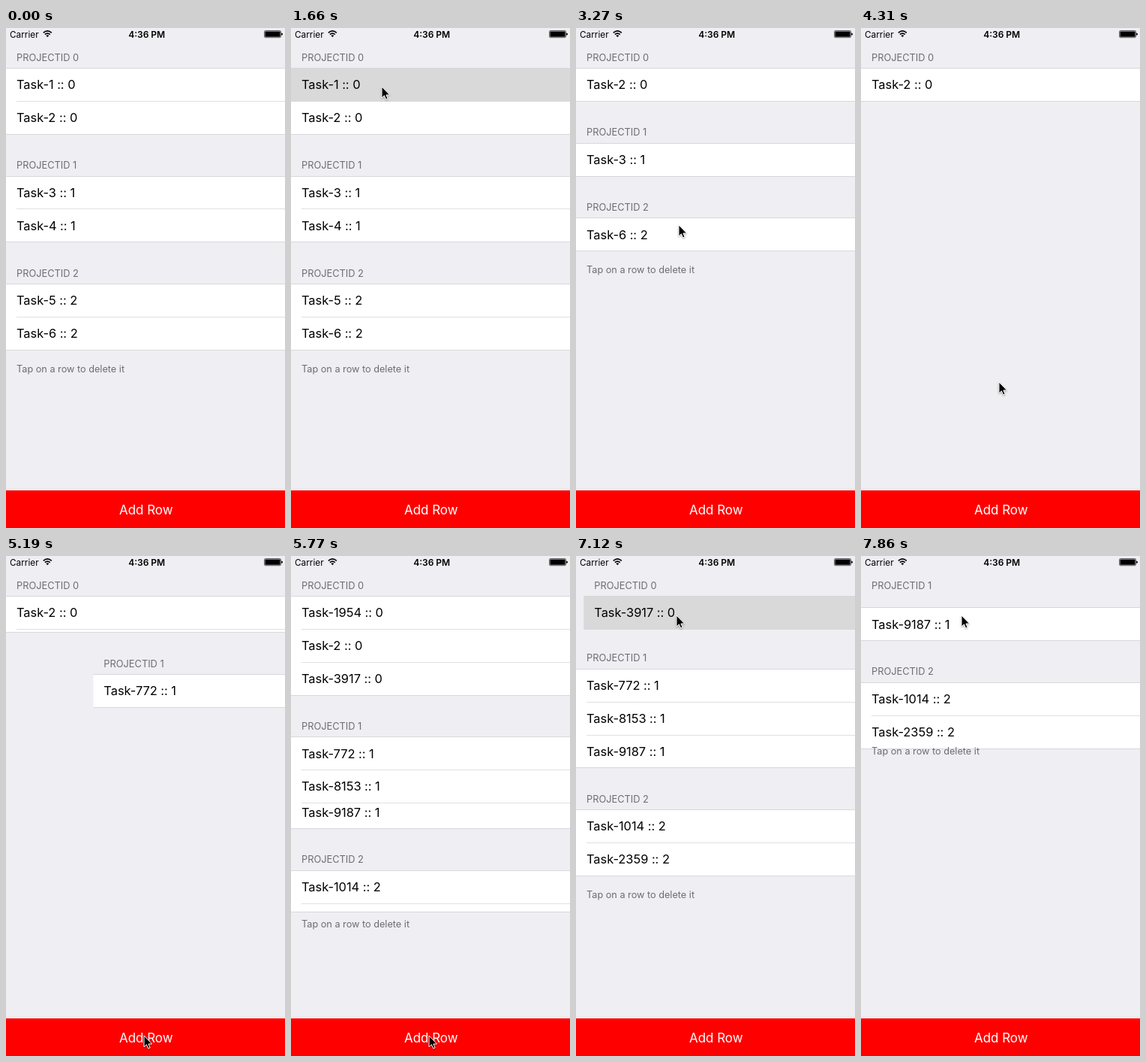
An HTML page for the animation above (8 s loop, 372 by 665 pixels).

```html
<!DOCTYPE html>
<html lang="en">
<head>
<meta charset="utf-8">
<title>Task list</title>
<style>
  html, body { margin: 0; width: 100%; height: 100%; overflow: hidden; background: #eeeef3; }
  svg { display: block; width: 372px; height: 665px; font-family: Inter, Roboto, "Liberation Sans", sans-serif; }
  .task { font-size: 16.4px; letter-spacing: -.02px; }
  .head { font-size: 12.8px; fill: #6d6d72; }
  .foot { font-size: 12.7px; fill: #6d6d72; }
</style>
</head>
<body>
<svg viewBox="0 0 372 665">
  <rect width="372" height="665" fill="#eeeef3"/>
  <g id="list"></g>
  <text x="5" y="12.6" font-size="11.8">Carrier</text>
  <g fill="none" stroke="#000" stroke-width="1.7">
    <path d="M49.8 6.3Q55.3 1.3 60.8 6.3M51.9 8.6Q55.3 5.5 58.7 8.6"/>
    <path d="M53.4 10.1Q55.3 8.4 57.2 10.1L55.3 12.2Z" fill="#000" stroke="none"/>
  </g>
  <text x="187.7" y="12.6" font-size="12" font-weight="600" text-anchor="middle">4:36 PM</text>
  <rect x="344.5" y="3.5" width="22" height="9.2" rx="1.6" fill="none" stroke="#000" stroke-width=".6"/>
  <rect x="345.4" y="4.4" width="20.2" height="7.4" rx=".6"/>
  <path d="M367.2 6.6Q369 6.8 369 8.2T367.2 9.8Z"/>
  <rect y="615" width="372" height="50" fill="#f00"/>
  <text x="186.8" y="646.5" font-size="16.9" fill="#fff" text-anchor="middle">Add Row</text>
  <g id="cursor" style="filter:drop-shadow(0 1px 1px rgba(0,0,0,.35))">
    <path d="M0 0V15L3.4 11.8L5.7 17L8.1 16L5.9 11H10.6Z" stroke="#fff" stroke-width="1"/>
  </g>
</svg>
<script>
const LOOP = 8000, WIDTH = 372, TOP = 53.6, ROW = 43.85, GAP = 55.75;
const MOVE = 280, PRESS = 100, NEVER = 1e9;

const row = (name, born = -NEVER, gone = NEVER) => ({ name, born, gone });
const section = (id, born, gone, ...rows) => ({ id, born, gone, rows });

const sections = [
  section(0, -NEVER, 7095,
    row(1, -NEVER, 1755), row(1954, 5440, 6400), row(2, -NEVER, 6700), row(3917, 5130)),
  section(1, -NEVER, 3880, row(3), row(4, -NEVER, 2200)),
  section(1, 5010, NEVER, row(772, -NEVER, 7400), row(8153, 5240, 7691), row(9187, 5574)),
  section(2, -NEVER, 3600, row(5, -NEVER, 2900), row(6)),
  section(2, 5340, NEVER, row(1014), row(2359, 5676)),
];

// time, x, y
const cursorPath = [
  [740, 83, 78], [1180, 121, 78], [1810, 121, 78], [2100, 130, 212], [2250, 130, 212],
  [2540, 137, 262], [3650, 137, 262], [3857, 150, 175], [3950, 150, 175], [4303, 184, 471],
  [4451, 184, 545], [4600, 183, 605], [4750, 184, 638], [5780, 184, 638], [6060, 150, 330],
  [6240, 134, 79], [LOOP, 134, 79],
];

// The screen refreshes in bursts: first time, last time, refresh count
const bursts = [
  [740, 1180, 4], [1660, 2680, 8], [2830, 3270, 4], [3560, 4600, 8],
  [4750, 4750, 1], [5040, 6060, 8], [6240, 7270, 8], [7410, 7860, 4],
];
const ticks = [0];
for (const [from, to, n] of bursts)
  for (let i = 0; i < n; i++) ticks.push(from + (n > 1 ? (to - from) * i / (n - 1) : 0));

const progress = (t, start) => {
  const u = Math.min(1, Math.max(0, (t - start) / MOVE));
  return u * u * (3 - 2 * u);
};
const presence = (item, t) => progress(t, item.born) * (1 - progress(t, item.gone));

const text = (cls, y, content) => `<text class="${cls}" x="14" y="${y.toFixed(2)}">${content}</text>`;
const line = (x, y, color) => `<rect x="${x}" y="${y}" width="${WIDTH - x}" height="1" fill="${color}"/>`;

function drawRow(r, id, y, pressed, first, last, opacity) {
  const top = Math.floor(y), bottom = Math.floor(y + ROW);
  return `<g opacity="${opacity}">
    <rect y="${top + 1}" width="${WIDTH}" height="${bottom - top}" fill="${pressed ? '#d9d9d9' : '#fff'}"/>
    ${first ? line(0, top, '#d8d7dc') : ''}
    ${line(last || pressed ? 0 : 14, bottom, last || pressed ? '#d8d7dc' : '#e0dfe3')}
    ${text('task', y + 27.7, `Task-${r.name} :: ${id}`)}</g>`;
}

function footerShift(t) {
  let shift = 0;
  for (const s of sections) for (const r of s.rows) {
    shift += 24 * Math.sin(Math.PI * progress(t, r.gone));
    if (s.id === 2) shift += 13 * Math.sin(Math.PI * progress(t, r.born));
  }
  return shift;
}

function drawSection(s, y, t) {
  const rows = s.rows.map(r => ({ r, p: presence(r, t) })).filter(o => o.p > 0);
  const fullBefore = i => rows.slice(0, i).some(o => o.p === 1);
  const moving = [], settled = [];
  let top = y;
  rows.forEach(({ r, p }, i) => {
    const hidden = p < 1 && fullBefore(i) ? ROW * (1 - p) : 0;
    const leaving = p < 1 && !hidden && t > r.gone;
    const pressed = t > Math.min(r.gone, s.gone) - PRESS;
    const opacity = leaving ? Math.max(0, 1 - 1.7 * (1 - p)) : 1;
    (p < 1 ? moving : settled).push(
      drawRow(r, s.id, top - hidden, pressed, !fullBefore(i), i === rows.length - 1, opacity));
    top += ROW * p;
  });
  const body = text('head', y - 10, `PROJECTID ${s.id}`) + moving.reverse().join('') + settled.join('')
    + (s.id === 2 ? text('foot', top + 29.6 - footerShift(t), 'Tap on a row to delete it') : '');
  return { body, height: top - y + GAP };
}

function drawList(t) {
  let y = TOP, out = '';
  for (const s of sections) {
    const p = presence(s, t);
    if (!p) continue;
    const { body, height } = drawSection(s, y, t);
    out = `<g transform="translate(${((1 - p) * WIDTH).toFixed(2)} 0)">${body}</g>` + out;
    y += height * p;
  }
  return out;
}

function cursorAt(t) {
  const i = cursorPath.findIndex(k => k[0] > t);
  const [t0, x0, y0] = cursorPath[i - 1], [t1, x1, y1] = cursorPath[i];
  const u = (t - t0) / (t1 - t0);
  return [x0 + (x1 - x0) * u, y0 + (y1 - y0) * u];
}

const list = document.getElementById('list'), cursor = document.getElementById('cursor');
let shown = -1;

function render(time) {
  const t = ticks.filter(k => k <= time + 8).pop();
  if (t === shown) return;
  shown = t;
  list.innerHTML = drawList(t);
  const visible = t >= cursorPath[0][0];
  cursor.setAttribute('visibility', visible ? 'visible' : 'hidden');
  if (visible) cursor.setAttribute('transform', `translate(${cursorAt(t)})`);
}

const start = performance.now();
function loop() {
  render((performance.now() - start) % LOOP);
  requestAnimationFrame(loop);
}
loop();
</script>
</body>
</html>
```
